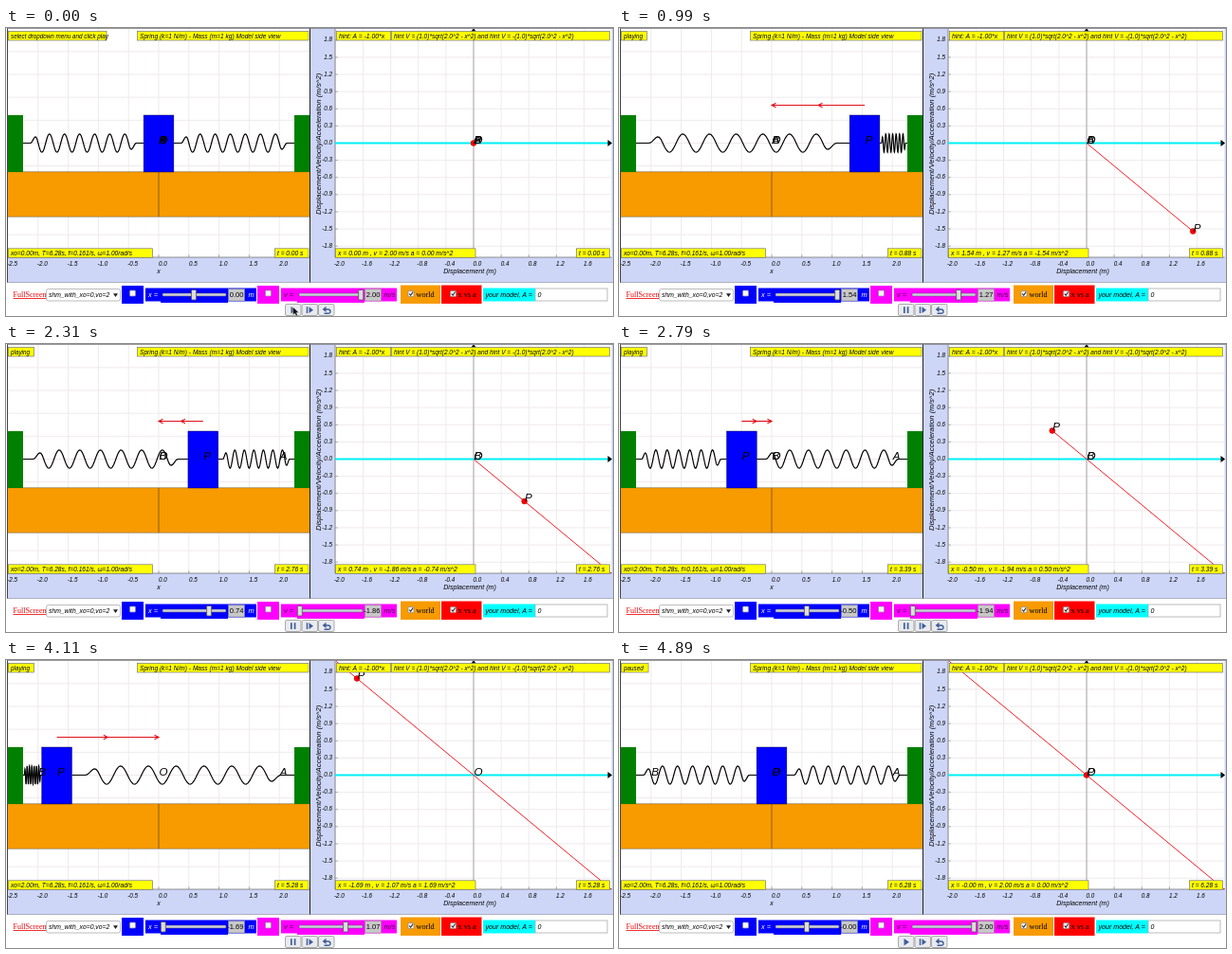
An HTML page for the animation above (5.29 s loop, 640 by 304 pixels).

```html
<!DOCTYPE html>
<html lang="en">
<head>
<meta charset="utf-8">
<title>Spring and mass</title>
<style>
  html, body { margin: 0; width: 100%; height: 100%; overflow: hidden; background: #fff; }
  svg { display: block; }
  text { font-family: "Liberation Sans", Arial, sans-serif; white-space: pre; }
  .it { font-style: italic; }
  .serif { font-family: "Liberation Serif", Times, serif; }
</style>
</head>
<body>
<svg id="stage" width="640" height="304" viewBox="0 0 640 304">
  <defs>
    <clipPath id="leftClip"><rect x="2" y="1" width="318" height="241"/></clipPath>
    <clipPath id="rightClip"><rect x="347" y="1" width="292" height="241"/></clipPath>
  </defs>
</svg>
<script>
const NS = 'http://www.w3.org/2000/svg';
const stage = document.getElementById('stage');
const LOOP = 5290, START = 260, FIRST = 390, STEP = 60, END = 4890;
// clock readings [ms, hundredths of a period]
const PACE = [[330, 0], [990, 14], [1530, 26], [2310, 44], [3330, 66], [4110, 84], [4890, 100]];
const MID = 121.5;
const worldX = x => 161 + 63.6 * x;
const plotX = x => 493 + 72.8 * x;
const plotY = y => MID - 60.4 * y;

function set(node, attrs) {
  for (const k in attrs) node.setAttribute(k, attrs[k]);
  return node;
}
function add(tag, attrs, parent = stage) {
  return parent.appendChild(set(document.createElementNS(NS, tag), attrs));
}
function rect(x, y, x2, y2, fill, more = {}, parent = stage) {
  return add('rect', { x, y, width: x2 - x, height: y2 - y, fill, ...more }, parent);
}
function line(x1, y1, x2, y2, stroke, width = 1, parent = stage, more = {}) {
  return add('line', { x1, y1, x2, y2, stroke, 'stroke-width': width, ...more }, parent);
}
function path(d, attrs, parent = stage) {
  return add('path', { d, fill: 'none', ...attrs }, parent);
}
function text(str, x, y, size = 6.6, more = {}, parent = stage) {
  const node = add('text', { x, y, 'font-size': size, class: 'it', ...more }, parent);
  node.textContent = str;
  return node;
}
const group = (attrs = {}) => add('g', attrs);
const show = (node, on) => node.setAttribute('visibility', on ? 'visible' : 'hidden');

// Panel backgrounds and grids
const LILAC = '#cdd6f7', GRID = '#f0e9eb';
rect(1, 0, 320, 269, LILAC);
rect(321, 0, 640, 269, LILAC);
rect(2, 1, 320, 242, '#fff');
rect(347, 1, 638.5, 242, '#fff');

const centred = { 'text-anchor': 'middle' };
for (let i = -5; i < 5; i++) {
  const x = worldX(i / 2), px = plotX(i * .4);
  line(x, 1, x, 242, GRID);
  line(x, 239, x, 242, '#888', .6);
  text((i / 2).toFixed(1), x + 4.5, 250.5, 6.3, centred);
  line(2, MID + i * 24.16, 320, MID + i * 24.16, GRID);
  line(px, 1, px, 242, GRID);
  line(px, 239, px, 242, '#888', .6);
  text((i * .4).toFixed(1), px + 4, 250.5, 6.3, centred);
}
for (let i = -6; i <= 6; i++) {
  const y = plotY(i * .3);
  line(347, y, 638, y, GRID);
  line(347, y, 350, y, '#888', .6);
  text((i * .3).toFixed(1), 344, y + 1.6, 6.3, { 'text-anchor': 'end' });
}
text('x', 161, 258.5, 7, centred);
text('Displacement (m)', 489, 258.5, 7.1, centred);
text('Displacement/Velocity/Acceleration (m/s^2)', 0, 0, 7.8,
  { transform: 'translate(332 197) rotate(-90)' });
line(1.5, 0, 1.5, 269, '#444');
line(320.5, 0, 320.5, 269, '#222');
line(1, .5, 640, .5, '#777', .7);
line(2, 242, 320, 242, '#666', .7);
line(347, 242, 638.5, 242, '#666', .7);
line(347, 1, 347, 242, '#666', .7);
line(1, 268.5, 640, 268.5, '#999', .6);

// Spring world
const world = group({ 'clip-path': 'url(#leftClip)' });
rect(2, 152, 320, 199, '#f79b00', {}, world);
line(2, 151.7, 320, 151.7, '#7a5a20', .6, world);
line(2, 199.3, 320, 199.3, '#7a5a20', .6, world);
const springs = [0, 1].map(() => path('', { stroke: '#000', 'stroke-width': 1.2 }, world));
rect(2, 92, 18, 152, '#008000', {}, world);
rect(304, 92, 320, 152, '#008000', {}, world);
const block = rect(0, 92, 31.8, 152, '#00f', { stroke: '#002', 'stroke-width': .4 }, world);
line(161, 152, 161, 199, '#432', .6, world);
const arrow = path('', { stroke: '#e01018', 'stroke-width': 1.2 }, world);
const heads = path('', { stroke: '#e01018', 'stroke-width': 1.1 }, world);

// Graph
const graph = group({ 'clip-path': 'url(#rightClip)' });
line(493, 1, 493, 242, '#888', .7, graph);
line(347, MID, 638, MID, '#00f0f5', 2, graph);
path('M634.5 118L639 121.5L634.5 125Z', { fill: '#000' }, graph);
path('M489.5 5L493 0L496.5 5Z', { fill: '#000' }, graph);
const trace = line(0, 0, 0, 0, '#f02028', 1, graph);
const dot = add('circle', { r: 3, fill: '#f00', stroke: '#900', 'stroke-width': .4 }, graph);

// Point names, shown in both panels
const marks = {};
for (const name of 'OABP') {
  marks[name] = [text(name, 0, 0, 11.6, {}, world), text(name, 0, 0, 11.6, {}, graph)];
}
function mark(name, x) {
  set(marks[name][0], { x: worldX(x) + .5, y: 121.7 });
  set(marks[name][1], { x: plotX(x) + .5, y: plotY(-x) });
}

// Yellow read-outs
function note(str, x, x2, y, size = 6.6) {
  const box = rect(x, y, x2, y + 9.5, '#ff0', { stroke: '#777', 'stroke-width': .7 });
  return { box, label: text(str, x + 2.5, y + 7.2, size) };
}
const status = note('', 2.5, 106, 3.5, 6.3);
note('Spring (k=1 N/m) - Mass (m=1 kg) Model side view', 138.5, 319, 3.5);
note('hint: A = -1.00*x', 348.5, 405.5, 3.5, 6.8);
note('hint V = (1.0)*sqrt(2.0^2 - x^2) and hint V = -(1.0)*sqrt(2.0^2 - x^2)', 406.5, 636.5, 3.5, 6.5);
const facts = note('', 2.5, 154.5, 232.8, 6.6);
const clocks = [note('', 283.5, 319, 232.8), note('', 601.5, 636.5, 232.8)];
const readout = note('', 347.5, 495, 232.8, 6.8);

// Control bar
const BLUE = '#00f', PINK = '#f0f';
text('FullScreen', 7.5, 284, 8.1, { class: 'serif', fill: '#e00', 'text-decoration': 'underline' });
rect(42.5, 275.5, 120.5, 288, '#fff', { rx: 2, stroke: '#aaa', 'stroke-width': .8 });
text('shm_with_xo=0,vo=2', 45, 283.6, 6.8);
path('M113 280.3H118L115.5 284Z', { fill: '#222' });

function checkbox(x, y, on) {
  rect(x, y, x + 6, y + 6, '#f4f4f4', { rx: 1, stroke: '#888', 'stroke-width': .7 });
  if (on) path(`M${x + 1.2} ${y + 3}l1.5 1.7l2.4 -3.7`, { stroke: '#222', 'stroke-width': 1.1 });
}
function slider(x, x2, zero, fill, ink, name, unit, unitX) {
  rect(x, 274.5, x2, 288.5, fill);
  text(name, x + 3, 284, 7.4, { fill: ink });
  rect(zero - 35, 275, zero + 36, 290, fill);
  rect(zero - 33, 280, zero + 34, 283, '#ccd', { stroke: '#556', 'stroke-width': .5, rx: 1 });
  const thumb = rect(0, 276.5, 5, 287, '#ddd', { rx: 1, stroke: '#555', 'stroke-width': .8 });
  rect(zero + 36.5, 275.5, zero + 53.5, 288, '#c8c8c8', { stroke: '#888', 'stroke-width': .5 });
  const value = text('', zero + 52.5, 284.3, 7.6, { class: '', 'text-anchor': 'end' });
  text(unit, unitX, 284, 7.4, { fill: ink });
  return v => {
    const snap = Math.max(-2, Math.min(2, Math.round(v)));
    thumb.setAttribute('x', zero - 2.5 + 16.1 * snap);
    value.textContent = v.toFixed(2);
  };
}
rect(122, 272, 145, 291, BLUE);
checkbox(130.5, 277, false);
const setX = slider(147, 264, 198, BLUE, '#fff', 'x =', 'm', 255.5);
rect(265, 272, 288, 291, PINK);
checkbox(273.5, 277, false);
const setV = slider(290, 412, 342, PINK, '#404', 'v =', 'm/s', 398.5);
rect(416, 271.5, 458, 291, '#f79b00');
checkbox(424, 277.5, true);
text('world', 432.5, 284, 8.2, { class: 'serif' });
rect(459, 271.5, 501.5, 291, '#f00');
checkbox(468.5, 277.5, true);
text('x vs a', 476.5, 284, 8.2, { class: 'serif' });
rect(503, 274.5, 558, 288.5, '#0ff');
text('your model, A =', 505.5, 284, 7.1);
rect(558, 275, 634, 288, '#fff', { stroke: '#aaa', 'stroke-width': .8 });
text('0', 560.5, 284.2, 7);

// Transport buttons
const ICON = '#3f5c9a';
const buttons = [294.5, 312, 329.5].map(x =>
  rect(x, 291.5, x + 16.5, 303.5, '#e9ebee', { rx: 1.5, stroke: '#999', 'stroke-width': .8 }));
const play = path('M300.5 294L306 297.7L300.5 301.4Z', { fill: ICON });
const pause = path('M300.8 294.3v6.8M304.6 294.3v6.8', { stroke: ICON, 'stroke-width': 1.7 });
path('M317.5 294.3v6.8', { stroke: ICON, 'stroke-width': 1.5 });
path('M319.5 294.3L324 297.7L319.5 301.1Z', { fill: ICON });
path('M336 297H339.5Q342 297 342 299.2T339.5 301.3H335.5', { stroke: ICON, 'stroke-width': 1.4 });
path('M337.5 293.8V300L333.6 297Z', { fill: ICON });
const cursor = path('M302.5 294.5V303l2 -1.8l1.4 2.8l1.6 -.8l-1.3 -2.6h2.7Z',
  { fill: '#111', stroke: '#fff', 'stroke-width': .4 });

// Eight loops with thin, tapered ends
function coil(from, to) {
  const loops = 8, per = 15, pre = 7, last = loops * per;
  let d = '';
  for (let i = 0; i <= last; i++) {
    const edge = Math.min(i, last - i);
    const size = Math.max(0, Math.min(edge - pre, pre)) / pre;
    const y = MID + 9.7 * size * Math.sin(2 * Math.PI * i / per);
    d += (i ? 'L' : 'M') + (from + (to - from) * i / last).toFixed(2) + ' ' + y.toFixed(2);
  }
  return d;
}

function phase(ms) {
  if (ms < FIRST) return 0;
  if (ms >= END) return 100;
  const at = FIRST + STEP * Math.floor((ms - FIRST) / STEP);
  const i = PACE.findIndex(p => p[0] > at);
  const [t0, u0] = PACE[i - 1], [t1, u1] = PACE[i];
  return Math.round(u0 + (u1 - u0) * (at - t0) / (t1 - t0));
}

function draw(ms) {
  const u = phase(ms), t = u * Math.PI / 50;
  const x = 2 * Math.sin(t), v = 2 * Math.cos(t);
  const running = ms >= START && ms < END;
  const cx = worldX(x);

  block.setAttribute('x', cx - 15.9);
  springs[0].setAttribute('d', coil(18, cx - 15.9));
  springs[1].setAttribute('d', coil(cx + 15.9, 304));

  const moved = Math.abs(x) > .01, back = Math.sign(x) * 4.5;
  show(arrow, moved);
  show(heads, moved);
  arrow.setAttribute('d', `M${cx} 81.5H161`);
  heads.setAttribute('d', [161, (161 + cx) / 2]
    .map(p => `M${p + back} 79.3L${p} 81.5l${back} 2.2`).join(''));

  const high = u >= 25 ? 2 : x;
  const low = u >= 75 ? -2 : Math.min(0, x);
  set(trace, { x1: plotX(low), y1: plotY(-low), x2: plotX(high), y2: plotY(-high) });
  set(dot, { cx: plotX(x), cy: plotY(-x) });

  mark('O', 0);
  mark('A', u >= 25 ? 2 : 0);
  mark('B', u >= 75 ? -2 : 0);
  mark('P', x);

  status.label.textContent = running ? 'playing' : u ? 'paused' : 'select dropdown menu and click play';
  status.box.setAttribute('width', running ? 27 : u ? 28.5 : 103.5);
  facts.label.textContent = `xo=${u >= 25 ? '2.00' : '0.00'}m, T=6.28s, f=0.161/s, ω=1.00rad/s`;
  for (const c of clocks) c.label.textContent = `t = ${t.toFixed(2)} s`;
  readout.label.textContent =
    `x = ${x.toFixed(2)} m , v = ${v.toFixed(2)} m/s a = ${(-x).toFixed(2)} m/s^2`;
  setX(x);
  setV(v);

  show(play, !running);
  show(pause, running);
  show(cursor, ms < START);
  buttons[0].setAttribute('fill', ms >= 60 && ms < START ? '#cfd6e2' : '#e9ebee');
}

const begin = performance.now();
function tick() {
  draw((performance.now() - begin) % LOOP);
  requestAnimationFrame(tick);
}
draw(0);
requestAnimationFrame(tick);
</script>
</body>
</html>
```
